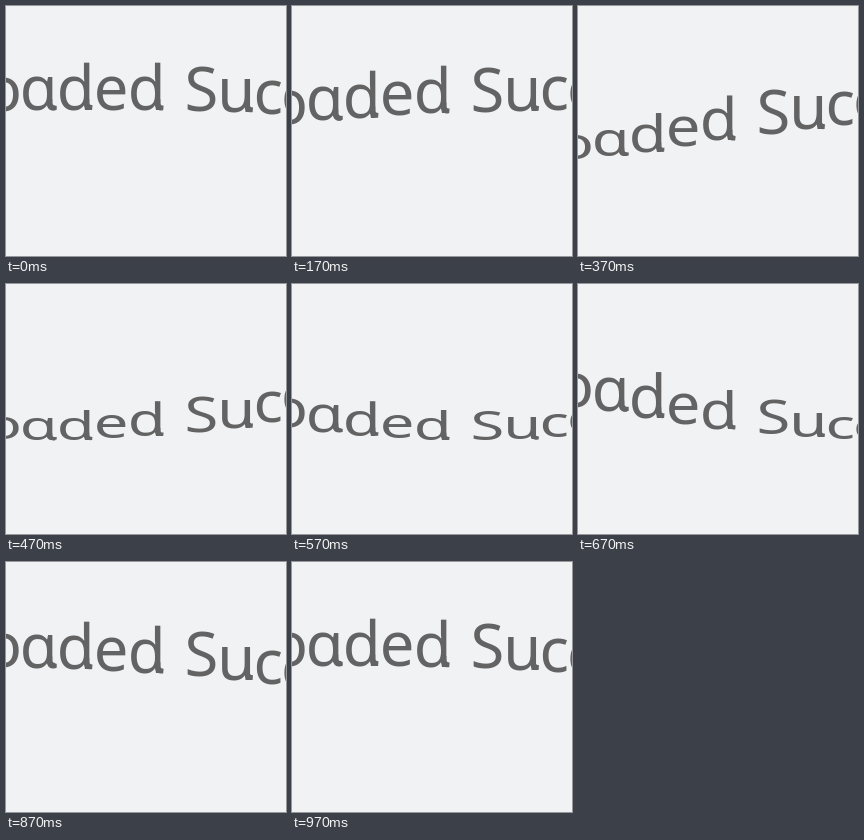
Recreate the animation shown at these times as an HTML page. Size 280 by 250 pixels, loop 1000 ms.

```html
<!DOCTYPE html>
<html lang="en">
<head>
<meta charset="utf-8">
<title>Loaded</title>
<style>
  html, body {
    margin: 0;
    width: 100%;
    height: 100%;
    overflow: hidden;
    background: #f1f2f4;
  }
  svg { display: block; width: 280px; height: 250px; }
  text { font: 400 61.5px "Noto Sans", "Open Sans", sans-serif; }
  .hop { fill: #636363; }

  /* Each letter starts 28 ms after the one on its left. */
  .hop {
    transform-origin: 0 0;
    animation: rise 500ms infinite alternate, squash 500ms infinite alternate;
    animation-delay: calc(var(--i) * 28ms - 564ms);
  }
  @keyframes rise {
    0% { translate: 0 156.3px; animation-timing-function: cubic-bezier(.333, 0, .667, .38); }
    40% { translate: 0 128.7px; animation-timing-function: cubic-bezier(.333, .767, .667, 1); }
    100% { translate: 0 103.7px; }
  }
  @keyframes squash {
    0% { scale: 1 .64; animation-timing-function: cubic-bezier(.38, 0, .66, .75); }
    40%, 100% { scale: 1 1; }
  }
</style>
</head>
<body>
<svg viewBox="0 0 280 250" role="img" aria-label="oaded Succ">
  <defs>
    <path id="tail" d="M-2.6-11H2.7V-7.5C2.7-5.3 3.6-4.6 5.9-4.6L5.5.2C.8.8-2.6-1.4-2.6-6.5Z"/>
  </defs>
  <g class="hop" style="--i:0"><text x="-21.3">o</text></g>
  <g class="hop" style="--i:1"><text x="13.7">ɑ</text><use href="#tail" x="43.6"/></g>
  <g class="hop" style="--i:2"><text x="50.7">d</text><use href="#tail" x="80.6"/></g>
  <g class="hop" style="--i:3"><text x="87.7">e</text></g>
  <g class="hop" style="--i:4"><text x="121.8">d</text><use href="#tail" x="151.7"/></g>
  <g class="hop" style="--i:5"><text x="178.4">S</text></g>
  <g class="hop" style="--i:6"><text x="211.2">u</text><use href="#tail" x="241.1"/></g>
  <g class="hop" style="--i:7"><text x="247.6">c</text></g>
  <g class="hop" style="--i:8"><text x="275">c</text></g>
</svg>
</body>
</html>
```
